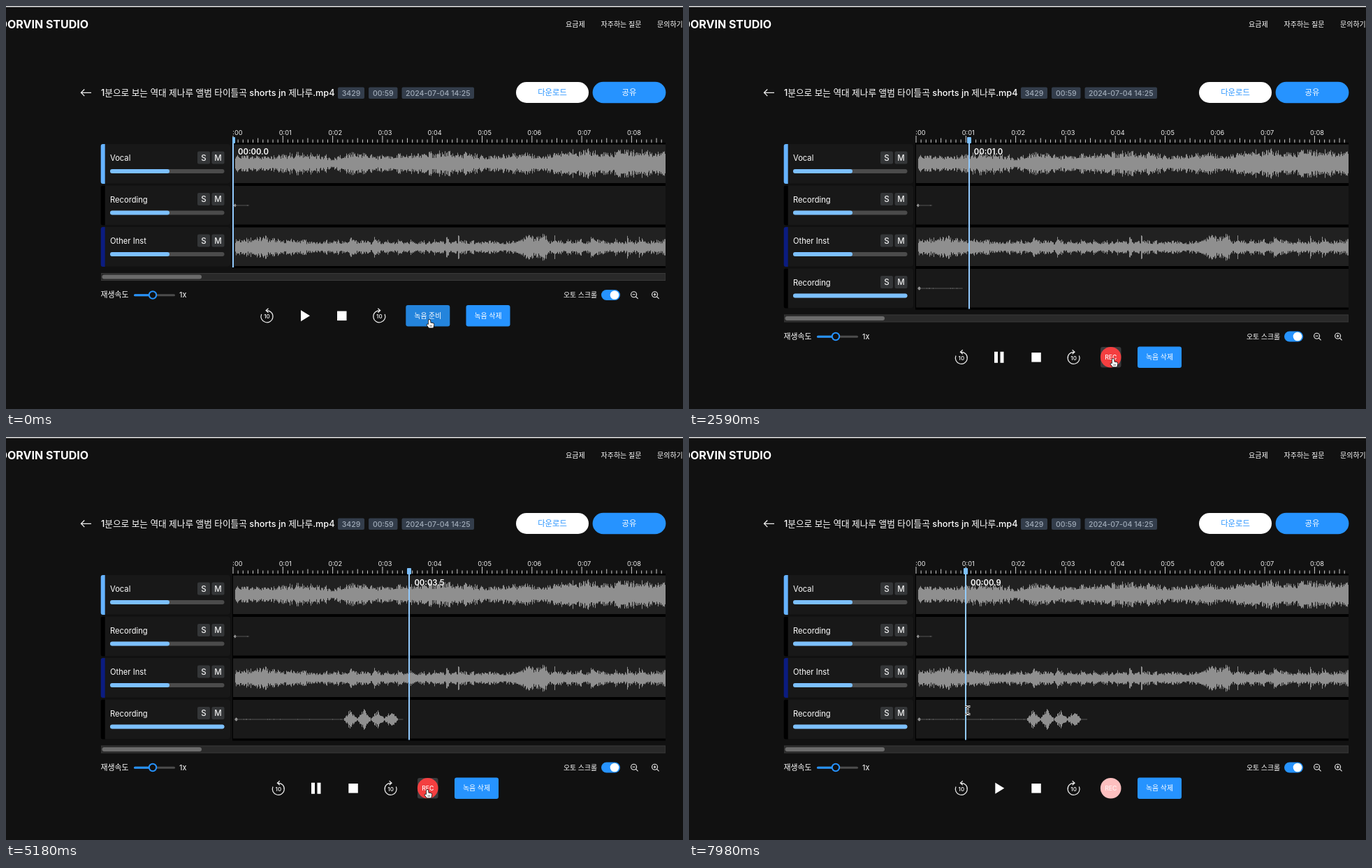
These frames come from a looping animation (969x578 px, 8000 ms). An HTML page with a canvas:

```html
<!DOCTYPE html>
<html lang="ko">
<head>
<meta charset="utf-8">
<title>Studio</title>
<style>
  html, body { margin: 0; height: 100%; overflow: hidden; background: #111; }
  canvas { display: block; }
</style>
</head>
<body>
<canvas id="stage" width="969" height="578"></canvas>
<script>
const ctx = document.getElementById('stage').getContext('2d');
const FONT = 'Inter, "Noto Sans CJK KR", "Noto Sans CJK", sans-serif';
const LOOP = 8000, STEP = 70;
const START_X = 325, END_X = 944, SECOND = 71.3, ROW = 59.5;
const ARMED = 490, PLAY = 1479, REC_END = 5300, PAUSE = 6880, SEEK = 7980;
const SPEED = 0.0682; // playhead pixels per ms
const BLUE = '#2693ff', SKY = '#7cc0ff';

// Interpolates rows of [key, ...values]
function at(keys, k, ease = u => u) {
  const i = keys.findIndex(row => row[0] > k);
  if (i < 0) return keys[keys.length - 1].slice(1);
  if (i === 0) return keys[0].slice(1);
  const a = keys[i - 1], b = keys[i];
  const u = ease((k - a[0]) / (b[0] - a[0]));
  return a.slice(1).map((v, j) => v + (b[j + 1] - v) * u);
}
const smooth = u => u * u * (3 - 2 * u);
const bump = (x, centre, width) => Math.exp(-(((x - centre) / width) ** 2));

function random(seed) {
  return () => (seed = seed * 16807 % 2147483647) / 2147483647;
}

// One bar per pixel; short clusters and single bars both vary in height
function waveform(y, from, to, loudness, seed) {
  const rnd = random(seed), path = new Path2D();
  let cluster = 1;
  for (let x = from; x < to; x++) {
    if (x % 5 === 0) cluster = 0.75 + 0.3 * rnd();
    const amp = Math.max(0.3, loudness(x) * cluster * (0.55 + 0.55 * rnd()));
    path.rect(x, y - amp, 1, amp * 2);
  }
  return path;
}

const phrases = [
  [328, 13], [375, 11], [425, 16], [470, 10], [500, 17], [535, 12],
  [635, 19], [690, 12], [735, 16], [770, 12], [815, 20], [944, 18]];
const beats = random(12), BEAT = 17.25;
const accents = Array.from({ length: 40 }, () => 2 + 8 * beats());

function instLoudness(x) {
  const beat = (x - START_X + 6) / BEAT, n = Math.floor(beat);
  const sustain = 9 + 5 * bump(x, 365, 40) + 9 * bump(x, 757, 20);
  return sustain + accents[n] * Math.exp(-4 * (beat - n));
}

function voiceLoudness(x) {
  const sung = x > 483 && x < 561;
  const hiss = 0.4 + 2.5 * bump(x, 329, 1.5);
  return sung ? 1 + (13 - Math.abs(x - 512) / 12) * Math.abs(Math.sin((x - 483) * Math.PI / 19.5)) : hiss;
}

const vocalWave = waveform(226, 328, END_X, x => at(phrases, x)[0], 71);
const instWave = waveform(346, 328, END_X, instLoudness, 29);
const oldTake = waveform(286, 326, 348, x => 0.4 + 2 * bump(x, 327, 1.5), 5);
const newTake = waveform(405, 327, 570, voiceLoudness, 43);

const pointer = [
  [630, 606, 450], [1260, 608, 503], [1750, 609, 505], [3430, 605, 507], [3640, 603, 503],
  [4480, 603, 503], [4690, 603, 506], [5740, 603, 506], [6370, 524, 506], [6580, 426, 498],
  [7210, 430, 499], [7840, 387, 391], [7980, 399, 392]];

function playheadX(t) {
  if (t >= SEEK) return 396;
  return START_X + SPEED * (Math.min(Math.max(t, PLAY), PAUSE) - PLAY);
}

function text(str, x, y, size, { color = '#fff', weight = 400, align = 'left' } = {}) {
  ctx.font = `${weight} ${size}px ${FONT}`;
  ctx.textAlign = align;
  ctx.fillStyle = color;
  ctx.fillText(str, x, y + size * 0.36);
}

function box(x, y, w, h, color, radius = 0) {
  ctx.fillStyle = color;
  ctx.beginPath();
  ctx.roundRect(x, y, w, h, radius);
  ctx.fill();
}

function disc(x, y, r, color) {
  ctx.fillStyle = color;
  ctx.beginPath();
  ctx.arc(x, y, r, 0, 7);
  ctx.fill();
}

function stroke(d, color = '#fff', width = 1.2) {
  ctx.strokeStyle = color;
  ctx.lineWidth = width;
  ctx.stroke(new Path2D(d));
}

function clipped(x, y, w, h, paint) {
  ctx.save();
  ctx.beginPath();
  ctx.rect(x, y, w, h);
  ctx.clip();
  paint();
  ctx.restore();
}

function button(label, x, y, color) {
  box(x, y, 63, 30.5, color, 3);
  text(label, x + 31.5, y + 15.2, 9.9, { weight: 500, align: 'center' });
}

function header() {
  box(0, 0, 969, 1.6, '#e4e4e4');
  text('DORVIN STUDIO', 118, 26.3, 16, { weight: 700, align: 'right' });
  text('요금제', 801, 26, 10, { weight: 500 });
  text('자주하는 질문', 851.5, 26, 10, { weight: 500 });
  text('문의하기', 932, 26, 10, { weight: 500 });

  stroke('M122 124.3H107.5M112.3 119.5L107.5 124.3L112.3 129.1', '#eee', 1.3);
  text('1분으로 보는 역대 제나루 앨범 타이틀곡 shorts jn 제나루.mp4', 136, 124.3, 12.7, { weight: 500 });
  for (const [label, x, w] of [['3429', 475, 38], ['00:59', 519, 41.5], ['2024-07-04 14:25', 566.5, 103.5]]) {
    box(x, 116.5, w, 16.5, '#333d4b', 2);
    text(label, x + w / 2, 125, 10.5, { color: '#a0abb8', weight: 500, align: 'center' });
  }
  box(730, 109, 104, 30, '#fff', 15);
  text('다운로드', 782, 124, 11.3, { color: BLUE, weight: 500, align: 'center' });
  box(839.6, 108.7, 104.8, 30.6, BLUE, 15.3);
  text('공유', 892, 124, 11.3, { weight: 500, align: 'center' });
}

function ruler() {
  for (let i = 0; i <= 86; i++) {
    const top = i % 10 === 0 ? 186 : i % 5 === 0 ? 189.5 : 191.5;
    box(START_X - 0.5 + i * SECOND / 10, top, 1, 196.5 - top, '#ccc');
  }
  clipped(START_X, 170, 620, 20, () => {
    for (let s = 0; s <= 8; s++) {
      text('0:0' + s, 328.5 + s * SECOND, 182, 9.2, { color: '#f0f0f0', align: 'center' });
    }
  });
}

function track(i, name, strip, level, laneColor) {
  const y = 198 + i * ROW;
  box(136, y, 185, 56.5, '#181818', 4);
  box(135.7, y, 6, 57, strip, [3, 0, 0, 3]);
  box(324, y - 2, 620, 61, '#000');
  box(START_X, y + 0.5, END_X - START_X, 55.5, laneColor);
  text(name, 149, y + 20, 11.2);
  for (const [label, x] of [['S', 274], ['M', 294.5]]) {
    box(x, y + 10.5, 18, 18, '#343638', 2);
    text(label, x + 9, y + 19.7, 11.5, { color: '#eee', weight: 500, align: 'center' });
  }
  box(149, y + 36, 163.5, 6, '#4b4b4b', 3);
  box(149, y + 36, 163.5 * level, 6, SKY, 3);
}

function settings(y) {
  box(136, y - 31.5, 808, 11, '#3a3a3a');
  box(136.5, y - 30.5, 807, 9, '#292929');
  box(137.5, y - 29, 142.5, 6, '#6b6b6b', 3);

  text('재생속도', 135.5, y, 10.9);
  box(183, y - 1.3, 59, 3, '#4c4c4c', 1.5);
  box(183, y - 1.3, 27, 3, BLUE, 1.5);
  disc(210, y, 6.2, BLUE);
  disc(210, y, 4.2, '#111');
  text('1x', 248, y, 11);

  text('오토 스크롤', 798, y, 9.9, { weight: 500 });
  box(852, y - 7.5, 27, 15, BLUE, 7.5);
  disc(871, y, 6.3, '#fff');
  for (const [x, plus] of [[898.6, ''], [928.6, 'M0 -2V2']]) {
    ctx.save();
    ctx.translate(x, y - 0.7);
    stroke('M4 0A4 4 0 1 1 -4 0A4 4 0 1 1 4 0M3 3L6 6M-2 0H2' + plus, '#eee', 1.1);
    ctx.restore();
  }
}

function skipIcon(x, y, dir) {
  ctx.save();
  ctx.translate(x, y + 1);
  ctx.scale(dir, 1);
  stroke('M-1 -8.5H0A8.5 8.5 0 1 1 -7.8 -3.4M2 -11.5L-1.4 -8.5L2 -5.5', '#eee', 1.2);
  ctx.restore();
  text('10', x, y + 1, 8, { weight: 500, align: 'center' });
}

function transport(x, y, playing) {
  skipIcon(x - 54.5, y, 1);
  if (playing) {
    box(x - 7.3, y - 8, 5, 16, '#fff');
    box(x + 1.2, y - 8, 5, 16, '#fff');
  } else {
    ctx.fillStyle = '#fff';
    ctx.fill(new Path2D(`M${x - 6} ${y - 8}L${x + 7} ${y}L${x - 6} ${y + 8}Z`));
  }
  box(x + 46, y - 6.7, 13.5, 13.5, '#fff');
  skipIcon(x + 106.3, y, -1);
}

function recButton(hover, enabled) {
  if (hover) box(589, 489, 29.5, 29.5, '#3a3a3c', 3);
  disc(603.7, 503.8, 14.8, enabled ? '#f43f40' : '#fdbfbf');
  text('REC', 603.7, 504, 8.6, { color: enabled ? '#fff' : '#fff3f3', weight: 500, align: 'center' });
}

function drawPlayhead(x, bottom) {
  const left = Math.round(x);
  clipped(324, 180, 620, 260, () => {
    box(left - 1, 190, 2, bottom - 190, '#93cbff');
    box(left - 3, 188, 6, 9, SKY, 1);
  });
  const tenths = Math.floor((x - START_X) / SECOND * 10);
  const label = `00:0${Math.floor(tenths / 10)}.${tenths % 10}`;
  text(label, x + 7, 208.5, 11.3, { weight: 600 });
}

const SHAPES = {
  hand: 'M-1.2 .8Q0 -.8 1.2 .8L1.6 4.4L5.6 5.2Q6.6 5.6 6.4 7L5.4 11.6H-.6L-3.6 7.4Q-3.4 5.8 -1.2 7Z',
  arrow: 'M0 0V10.5L2.4 8.3L4.2 12.2L6 11.4L4.3 7.6H7.6Z',
  beam: 'M-3.5 -5.5H-1.5L0 -4L1.5 -5.5H3.5M-3.5 5.5H-1.5L0 4L1.5 5.5H3.5M0 -4V4M-1.5 1H1.5'
};

function drawCursor(kind, x, y) {
  const shape = new Path2D(SHAPES[kind]);
  ctx.save();
  ctx.translate(x, y);
  if (kind === 'beam') {
    stroke(shape, '#eee', 2.8);
    stroke(shape, '#111', 1);
  } else {
    const [fill, edge] = kind === 'hand' ? ['#fff', '#111'] : ['#111', '#fff'];
    ctx.lineJoin = 'round';
    stroke(shape, edge, 1.6);
    ctx.fillStyle = fill;
    ctx.fill(shape);
    if (kind === 'hand') stroke('M1.2 7.5V10M3.2 7.5V10', '#222', 0.7);
  }
  ctx.restore();
}

function tooltip(x, y) {
  box(x, y, 124.5, 16.5, '#767676', 1);
  box(x + 0.7, y + 0.7, 123.1, 15.1, '#454545', 1);
  text('REC: 오락, 레크리에이션, 유원지', x + 62.2, y + 8.3, 8.6, { align: 'center' });
}

function draw(t) {
  const armed = t >= ARMED;
  const drop = armed ? ROW : 0;
  const headX = playheadX(t);
  const [px, py] = at(pointer, t, smooth);
  const overRec = armed && Math.abs(px - 603.5) < 15 && Math.abs(py - 503.5) < 15;
  const overLane = armed && py > 377 && py < 434;

  box(0, 0, 969, 578, '#111');
  header();
  ruler();
  track(0, 'Vocal', '#66b3ff', 0.52, '#212121');
  track(1, 'Recording', '#000', 0.52, '#191919');
  track(2, 'Other Inst', '#0b1c80', 0.52, '#212121');
  if (armed) track(3, 'Recording', '#000', 1, '#191919');

  ctx.fillStyle = '#8f8f8f';
  for (const wave of [vocalWave, instWave, oldTake]) ctx.fill(wave);
  if (t >= PLAY) {
    const recorded = playheadX(Math.min(t, REC_END)) - START_X - 9;
    clipped(START_X, 377, Math.max(0, recorded), 57, () => ctx.fill(newTake));
  }

  settings(414.5 + drop);
  transport(armed ? 444.3 : 428, 444.3 + drop, t >= PLAY && t < PAUSE);
  if (armed) {
    recButton(overRec, t < REC_END);
    button('녹음 삭제', 642, 488.5, BLUE);
  } else {
    button('녹음 준비', 572.3, 429, '#2484dc');
    button('녹음 삭제', 658.5, 429, BLUE);
  }

  drawPlayhead(headX, 375 + drop);
  if ((t >= 1400 && t < 1540) || (t >= 3710 && t < 4480)) tooltip(px + 1.7, py + 26);
  drawCursor(!armed || overRec ? 'hand' : overLane ? 'beam' : 'arrow', px, py);
}

function frame() {
  const t = performance.now() % LOOP;
  draw(Math.floor(t / STEP) * STEP);
  requestAnimationFrame(frame);
}
frame();
</script>
</body>
</html>
```
